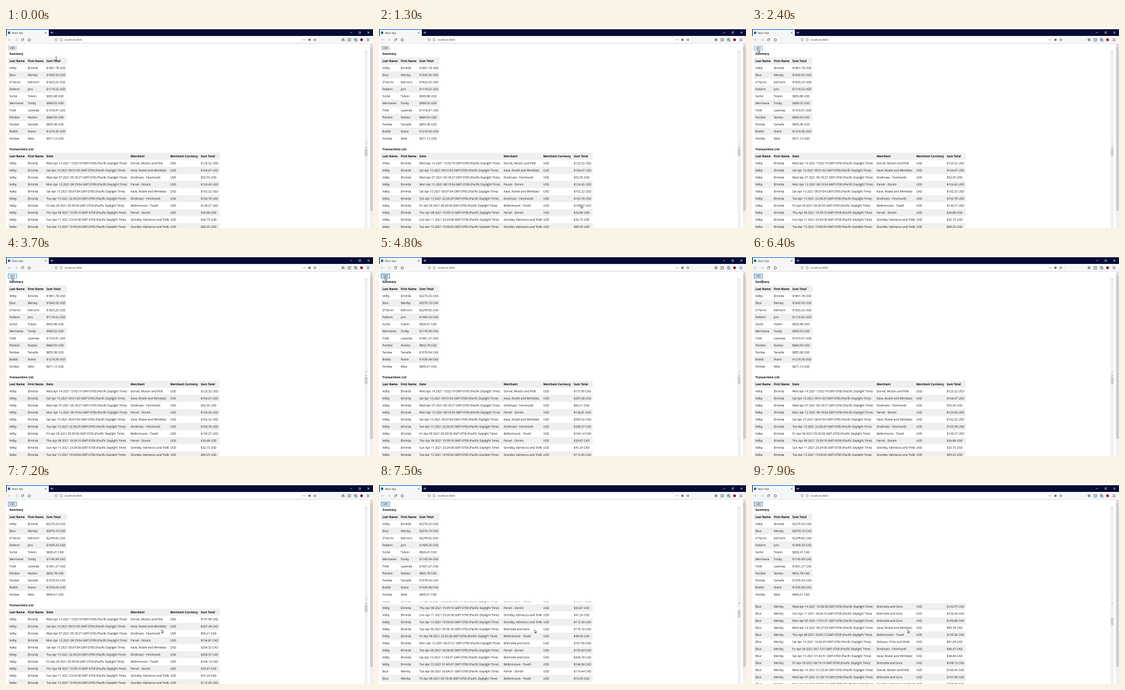
Recreate the animation shown at these times as an HTML page with a canvas. Size 600 by 328 pixels, loop 8000 ms.

```html
<!DOCTYPE html>
<html lang="en">
<head>
<meta charset="utf-8">
<title>React App</title>
<style>
html, body { margin: 0; width: 100%; height: 100%; overflow: hidden; background: #fff; }
canvas { display: block; width: 600px; height: 328px; }
</style>
</head>
<body>
<canvas id="stage" width="600" height="328"></canvas>
<script>
const W = 600, H = 328, LOOP = 8000, STEP = 100, SS = 4;
const PITCH = 11.5625, RATE = 1.26;
const FONT = '"Open Sans", "Noto Sans", sans-serif';
const out = document.getElementById('stage').getContext('2d');
const big = document.createElement('canvas');
big.width = W * SS;
big.height = H * SS;
const g = big.getContext('2d');
g.scale(SS, SS);
out.imageSmoothingQuality = 'high';

// Amounts are in CAD; USD is derived from the rate.
const people = [
  ['Velby', 'Elmirda', 2270.246], ['Ebur', 'Merilsy', 2070.096],
  ["O'Tarvin", 'Kelmorn', 2299.82], ['Feldorn', 'Jorv', 1409.33],
  ['Sorbe', 'Tolven', 826.41], ['Merrivane', 'Tonby', 1145.99],
  ['Trelk', 'Lavenda', 1661.27], ['Pardovi', 'Noelva', 832.776],
  ['Fenlow', 'Tamelle', 1078.54], ['Bralds', 'Ilvane', 1535.06],
  ['Fenlow', 'Mive', 845.61]
];
const merchants = {
  D: ['Dorvel, Mostin and Pelk', 'USD'],
  K: ['Kave, Rostel and Wimblatz', 'CAD'],
  F: ['Dreilmatz - Fennhardt', 'USD'],
  P: ['Parvel - Donim', 'USD'],
  B: ['Bellermoore - Tovelt', 'USD'],
  G: ['Grentby, Valmecco and Trelk', 'USD'],
  S: ['Bremolte and Sons', 'CAD'],
  W: ['Delavon, Tirbs and Wrelt', 'CAD']
};
// weekday, day, time, merchant, amount
const deals = `Wed 14 13:02:19 D 157.90
Sat 10 09:51:03 K 207.48
Wed 07 00:18:27 F 66.21
Mon 12 08:19:54 P 156.81
Sat 10 06:07:04 K 204.52
Tue 13 22:30:29 F 206.366
Fri 09 05:30:58 B 164.14
Thu 08 15:39:10 P 33.87
Sun 11 23:24:58 G 41.24
Tue 13 19:50:04 G 112.45
Tue 06 05:36:18 S 179.72
Fri 09 22:55:28 B 48.59
Mon 12 08:27:21 S 167.96
Tue 06 04:38:45 P 155.84
Sat 10 11:43:47 S 200.78
Tue 13 01:40:47 B 166.36
Tue 06 03:04:31 P 110.44
Fri 09 05:18:48 B 16.95
Sun 11 09:12:44 B 73.20
Wed 14 16:58:38 S 142.97
Sun 11 18:54:16 S 102.44
Mon 05 15:51:31 S 189.88
Wed 14 00:27:03 K 85.78
Thu 08 23:00:13 B 105.36
Sat 10 16:26:29 W 81.69
Fri 09 05:17:07 F 96.47
Sat 10 01:43:51 K 34.84
Fri 09 00:19:19 S 168.15
Wed 14 01:23:36 D 185.43
Wed 07 01:30:13 S 167.06
Mon 12 06:53:13 G 198.65`.split('\n').map((line, i) => {
  const [wd, day, time, m, sum] = line.split(' ');
  const date = `${wd} Apr ${day} 2021 ${time} GMT-0700 (Pacific Daylight Time)`;
  return [...people[i < 16 ? 0 : 1].slice(0, 2), date, ...merchants[m], +sum];
});

const sumCols = [5.5, 35.5, 66];
const listCols = [5.5, 35.5, 66, 203.8, 268.5, 318.5];
const toggles = [3100, 3700, 4200, 5300, 6900];
const presses = [[2900, 3100], [3500, 3700], [3900, 4200], [4800, 5300], [6800, 6900]];
const scrolls = [[7900, 240.5], [7600, 120.3], [7500, 99.5]];
// time, x, y
const path = [
  [400, 82, 50], [1300, 330, 290], [2100, 18.6, 37], [2200, 18.6, 37], [2400, 9.5, 35],
  [5300, 9.5, 35], [5700, 368, 245], [6100, 23, 62], [6400, 16.5, 42],
  [6600, 9.5, 35], [6900, 9.5, 35], [7200, 254.3, 239]
];
const textZones = [[66, 48, 24, 10], [5, 39.5, 24, 6]];

const inside = (x, y, [rx, ry, w, h]) => x >= rx && x <= rx + w && y >= ry && y <= ry + h;

function rect(x, y, w, h, fill) {
  g.fillStyle = fill;
  g.fillRect(x, y, w, h);
}
function line(color, width, ...pts) {
  g.strokeStyle = color;
  g.lineWidth = width;
  g.beginPath();
  for (let i = 0; i < pts.length; i += 2) g.lineTo(pts[i], pts[i + 1]);
  g.stroke();
}
function box(x, y, w, h, color, width) {
  g.strokeStyle = color;
  g.lineWidth = width;
  g.strokeRect(x, y, w, h);
}
function arc(x, y, r, color, width, from = 0, to = 7) {
  g.strokeStyle = color;
  g.lineWidth = width;
  g.beginPath();
  g.arc(x, y, r, from, to);
  g.stroke();
}
function dot(x, y, r, fill) {
  g.fillStyle = fill;
  g.beginPath();
  g.arc(x, y, r, 0, 7);
  g.fill();
}
function poly(fill, ...pts) {
  g.fillStyle = fill;
  g.beginPath();
  for (let i = 0; i < pts.length; i += 2) g.lineTo(pts[i], pts[i + 1]);
  g.closePath();
  g.fill();
}
function text(str, x, y, size = 4.78, weight = 400, color = '#111', align = 'left') {
  g.font = `${weight} ${size}px ${FONT}`;
  g.fillStyle = color;
  g.textAlign = align;
  g.fillText(str, x, y + size * 0.357);
}
const bold = (str, x, y) => text(str, x, y, 4.72, 700, '#000');

function browser() {
  const ink = '#4a4a4f', pale = '#b8b8bc', white = '#fff';
  rect(0, 2, W, 11, '#050b35');
  rect(1, 2.4, 69, 10.6, '#f5f6f7');
  rect(1, 2.2, 69, 0.8, '#0a84ff');
  dot(5, 7.8, 2.2, '#2b6f86');
  text('React App', 9.5, 8, 3.95, 400, '#18181a');
  line(ink, 0.5, 63.6, 6.6, 66, 9);
  line(ink, 0.5, 66, 6.6, 63.6, 9);
  line(white, 0.6, 72.8, 7.7, 77.2, 7.7);
  line(white, 0.6, 75, 5.5, 75, 9.9);
  line(white, 0.5, 562.6, 7.6, 565.8, 7.6);
  box(577, 6.2, 2.8, 2.8, white, 0.5);
  line(white, 0.5, 591, 6, 594, 9);
  line(white, 0.5, 594, 6, 591, 9);

  rect(0, 13, W, 12.6, '#f5f6f7');
  rect(0, 25.4, W, 0.4, '#ccc');
  for (const [x, d, c] of [[6, 1, pale], [16.5, -1, pale]]) {
    line(c, 0.6, x - 2.3 * d, 19.3, x + 2.3 * d, 19.3);
    line(c, 0.6, x - 0.3 * d, 17.2, x - 2.3 * d, 19.3, x - 0.3 * d, 21.4);
  }
  arc(27, 19.3, 1.9, ink, 0.6, 0.5, 5.6);
  poly(ink, 29.4, 16.8, 29.4, 19.2, 27.2, 19);
  line(ink, 0.6, 35.6, 19.4, 38, 17, 40.4, 19.4);
  line(ink, 0.6, 36.5, 19, 36.5, 21.6, 39.5, 21.6, 39.5, 19);

  rect(77, 14.3, 434, 10, white);
  box(77, 14.3, 434, 10, '#cfcfd1', 0.35);
  line(ink, 0.5, 82, 17, 84, 17.6, 83.6, 20, 82, 21.7, 80.4, 20, 80, 17.6, 82, 17);
  box(88.8, 17.3, 2.8, 4, ink, 0.5);
  text('localhost:3000', 96, 19.3, 4.15, 400, '#222');
  for (const x of [485.6, 487.4, 489.2]) dot(x, 19.3, 0.5, ink);
  rect(494.4, 17.6, 3.4, 3.4, '#6a6a6f');
  g.beginPath();
  for (let i = 0; i < 10; i++) {
    const a = i * Math.PI / 5 - Math.PI / 2, r = i % 2 ? 1.1 : 2.5;
    g.lineTo(505 + r * Math.cos(a), 19.3 + r * Math.sin(a));
  }
  g.closePath();
  g.strokeStyle = ink;
  g.lineWidth = 0.5;
  g.stroke();

  for (const x of [549.2, 550.4, 551.6]) line(ink, 0.6, x, 17, x, 21.6);
  line(ink, 0.6, 552.4, 17.2, 553.8, 21.6);
  box(559, 17.3, 4.6, 4, ink, 0.6);
  line(ink, 0.6, 561, 17.3, 561, 21.3);
  arc(571.3, 19.3, 2.3, ink, 0.6);
  dot(571.3, 18.7, 0.9, ink);
  dot(573.2, 21, 1, '#0a84ff');
  dot(581.3, 19.3, 2.3, '#a3122a');
  for (const y of [17.6, 19.3, 21]) line(ink, 0.6, 589.6, y, 594, y);
}

function scrollbar(x, y, w, h, thumbY, thumbH) {
  const c = x + w / 2, b = y + h;
  rect(x, y, w, h, '#f0f0f0');
  if (thumbH) rect(x + 0.3, thumbY, w - 0.6, thumbH, '#cdcdcd');
  const ink = thumbH ? '#606060' : '#a8a8a8';
  line(ink, 0.6, c - 1.1, y + 3.2, c, y + 2.1, c + 1.1, y + 3.2);
  line(ink, 0.6, c - 1.1, b - 3.2, c, b - 2.1, c + 1.1, b - 3.2);
}

function table(y, right, cols, heads, rows, currency) {
  const money = v => `$${(currency === 'CAD' ? v : v / RATE).toFixed(2)} ${currency}`;
  [heads, ...rows].forEach((row, i) => {
    const cy = y + i * PITCH;
    if (i % 2 === 0) rect(3.1, cy - PITCH / 2, right - 3.1, PITCH, '#efefef');
    row.forEach((cell, c) => {
      if (i === 0) bold(cell, cols[c], cy);
      else text(typeof cell === 'number' ? money(cell) : cell, cols[c], cy);
    });
  });
}

function button(label, hover, pressed, focused) {
  const fill = pressed ? '#cce4f7' : hover ? '#e5f1fb' : '#e1e1e1';
  const edge = pressed ? '#005499' : hover || focused ? '#0078d7' : '#adadad';
  rect(3.1, 29.1, 14.4, 7.4, fill);
  box(3.3, 29.3, 14, 7, edge, focused ? 0.6 : 0.4);
  text(label, 10.3, 32.8, 3.85, 400, '#000', 'center');
}

function pointer(x, y) {
  g.beginPath();
  for (const [dx, dy] of [[0, 0], [0, 5.3], [1.2, 4.2], [2, 6], [2.8, 5.6], [2, 3.9], [3.7, 3.8]])
    g.lineTo(x + dx, y + dy);
  g.closePath();
  g.fillStyle = '#fff';
  g.fill();
  g.strokeStyle = '#000';
  g.lineWidth = 0.4;
  g.stroke();
}
function ibeam(x, y) {
  line('#000', 0.5, x, y - 2.6, x, y + 2.6);
  for (const d of [-2.6, 2.6]) line('#000', 0.5, x - 1.1, y + d, x + 1.1, y + d);
}

function cursorAt(t) {
  if (t <= path[0][0]) return path[0].slice(1);
  const i = path.findIndex(p => p[0] >= t);
  if (i < 0) return path[path.length - 1].slice(1);
  const [t0, x0, y0] = path[i - 1], [t1, x1, y1] = path[i];
  const u = (t - t0) / (t1 - t0), e = u * u * (3 - 2 * u);
  return [x0 + (x1 - x0) * e, y0 + (y1 - y0) * e];
}

function draw(t) {
  const currency = toggles.filter(v => t >= v).length % 2 ? 'CAD' : 'USD';
  const scroll = (scrolls.find(s => t >= s[0]) || [0, 0])[1];
  const [x, y] = cursorAt(t);

  rect(0, 0, W, H, '#fff');
  browser();
  button(currency, inside(x, y, [3, 29, 14.5, 7.5]),
    presses.some(([a, b]) => t >= a && t < b), t >= presses[0][0]);

  bold('Summary', 5.5, 42.4);
  table(54, 99, sumCols, ['Last Name', 'First Name', 'Sum Total'], people, currency);
  scrollbar(586.3, 36.5, 4.9, 156);

  g.save();
  g.beginPath();
  g.rect(0, 192.5, W, H - 192.5);
  g.clip();
  g.translate(0, -scroll);
  bold('Transactions List', 5.5, 198.7);
  table(210.3, 349.5, listCols,
    ['Last Name', 'First Name', 'Date', 'Merchant', 'Merchant Currency', 'Sum Total'], deals, currency);
  g.restore();
  scrollbar(586.3, 192.8, 4.9, 140, 198 + scroll * 0.0875, 12.2);
  scrollbar(595, 25.8, 5, 306, 31, 269);

  if (textZones.some(z => inside(x, y, z))) ibeam(x, y);
  else pointer(x, y);
  out.drawImage(big, 0, 0, W, H);
}

let last = -1;
const start = performance.now();
function tick() {
  const t = Math.floor((performance.now() - start) % LOOP / STEP) * STEP;
  if (t !== last) draw(last = t);
  requestAnimationFrame(tick);
}
tick();
</script>
</body>
</html>
```
